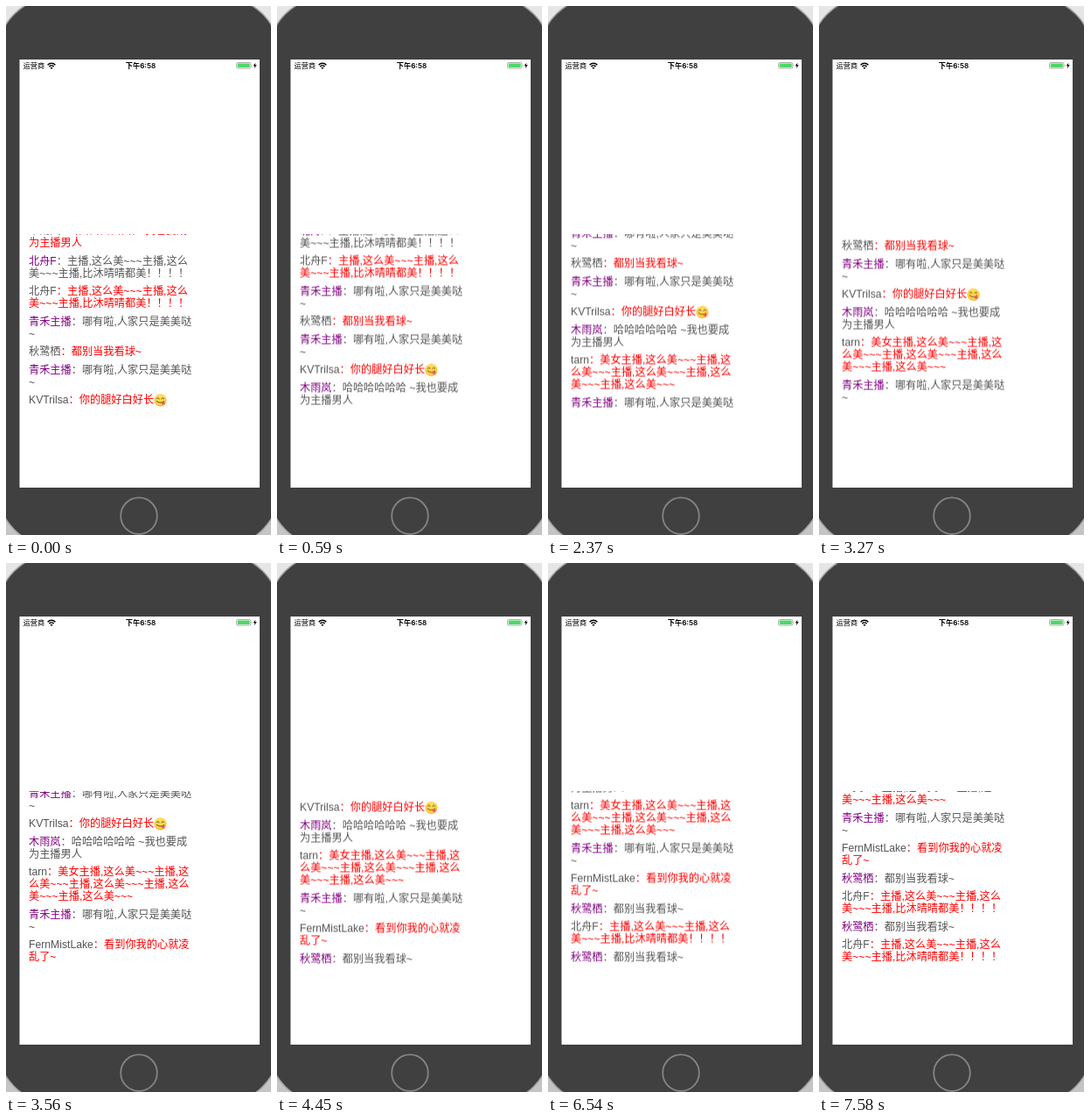
These frames come from a looping animation (303x603 px, 8 s). An HTML page:

```html
<!DOCTYPE html>
<html lang="zh-CN">
<head>
<meta charset="utf-8">
<title>聊天滚动</title>
<style>
  html, body { margin: 0; width: 100%; height: 100%; overflow: hidden; background: #e4e4e4; }
  .phone { position: absolute; left: 0; top: 0; display: block; }
  .status { font: 8.2px "Liberation Sans", "Noto Sans CJK SC", sans-serif; }
  .clock { font: 600 8.2px Inter, "Noto Sans CJK SC", sans-serif; }

  .chat { position: absolute; left: 26px; top: 260px; width: 200px; height: 199px; overflow: hidden; }
  .list { position: absolute; left: 0; top: -11px; animation: scroll 8s step-end infinite; }
  .row {
    margin-bottom: 6.5px;
    font: 12.2px/14px "Liberation Sans", "Noto Sans CJK SC", sans-serif;
    white-space: pre;
    color: #555;
  }
  .row b { font-weight: 400; }
  .host b { color: #800080; }
  .fan { color: #f00; }
  .fan b { color: #555; }
  .face { width: 15px; height: 15px; margin: -2px 0; vertical-align: -2px; }

  /* One message arrives about every second and slides in over 0.3 s */
  @keyframes scroll {
    0%      { transform: translateY(0); }
    3.625%  { transform: translateY(-3px); }
    5.5%    { transform: translateY(-27px); }
    7.375%  { transform: translateY(-34.5px); }
    16.75%  { transform: translateY(-46.5px); }
    18.5%   { transform: translateY(-78px); }
    20.375% { transform: translateY(-83px); }
    29.625% { transform: translateY(-100.5px); }
    31.5%   { transform: translateY(-117.5px); }
    40.875% { transform: translateY(-120.5px); }
    42.625% { transform: translateY(-144.5px); }
    44.5%   { transform: translateY(-152px); }
    53.875% { transform: translateY(-157.5px); }
    55.625% { transform: translateY(-170.5px); }
    57.5%   { transform: translateY(-172.5px); }
    66.75%  { transform: translateY(-190px); }
    68.625% { transform: translateY(-207px); }
    78%     { transform: translateY(-208.5px); }
    79.875% { transform: translateY(-222.5px); }
    81.75%  { transform: translateY(-227.5px); }
    91%     { transform: translateY(-235.5px); }
    92.875% { transform: translateY(-259px); }
    94.75%, 100% { transform: translateY(-262px); }
  }
</style>
</head>
<body>
<svg class="phone" width="303" height="603" viewBox="0 0 303 603">
  <defs>
    <linearGradient id="desk" x2="0" y2="1">
      <stop stop-color="#e6e6e6"/>
      <stop offset="1" stop-color="#c4c4c4"/>
    </linearGradient>
  </defs>
  <rect width="303" height="603" fill="url(#desk)"/>
  <rect x="-10" y="-10" width="323" height="626" rx="66" fill="#404040" stroke="#a3a3a3" stroke-width="1.5"/>
  <rect x="15.5" y="61" width="274.5" height="488" fill="#fff"/>
  <circle cx="152" cy="581.2" r="20.8" fill="none" stroke="#838383" stroke-width="1.8"/>

  <text class="status" x="19.5" y="71">运营商</text>
  <g fill="none" stroke="#000" stroke-width="1.5">
    <path d="M47.6 67.2a6.2 6.2 0 0 1 8.8 0"/>
    <path d="M49.4 69.1a3.7 3.7 0 0 1 5.2 0"/>
  </g>
  <path d="M52 72l-1.5-1.6a2.2 2.2 0 0 1 3 0z"/>
  <text class="clock" x="154" y="71" text-anchor="middle">下午6:58</text>
  <rect x="263.5" y="64.5" width="16.4" height="6.6" rx="1.6" fill="none" stroke="#999" stroke-width=".8"/>
  <rect x="264.7" y="65.6" width="14" height="4.4" rx=".8" fill="#4cd964"/>
  <path d="M280.8 66.6q1.1 1.2 0 2.4z" fill="#999"/>
  <path d="M285.6 64.4l-3 3.9h1.9l-.8 3 3.1-4h-2z"/>
</svg>

<div class="chat"><div class="list" id="list"></div></div>

<script>
  const praise = '主播,这么美~~~主播,这么\n美~~~主播,比沐晴晴都美！！！！';
  const shy = '哪有啦,人家只是美美哒\n~';
  const laugh = '哈哈哈哈哈哈 ~我也要成\n为主播男人';
  const ball = '都别当我看球~';
  const long = '美女主播,这么美~~~主播,这\n么美~~~主播,这么美~~~主播,这么\n美~~~主播,这么美~~~';
  const face = `<svg class="face" viewBox="0 0 30 30">
    <circle cx="15" cy="15" r="14" fill="#f9b52c"/>
    <circle cx="15" cy="13.5" r="12.4" fill="#ffdb55"/>
    <g fill="none" stroke="#6b3d0c" stroke-width="2" stroke-linecap="round">
      <path d="M6.5 11.5q3-5 6 0M17.5 11.5q3-5 6 0"/>
      <path d="M6.5 17q8.500 7 17 0"/>
    </g>
    <path d="M16 20.300q5-1 7-3.300q4 4 1.500 7q-4 3-8.500-3.700z" fill="#ee5a5f"/>
  </svg>`;

  const rows = [
    ['fan', '木雨岚', laugh],
    ['host', '北舟F', praise],
    ['fan', '北舟F', praise],
    ['host', '青禾主播', shy],
    ['fan', '秋鹭栖', ball],
    ['host', '青禾主播', shy],
    ['fan', 'KVTrilsa', '你的腿好白好长' + face],
    ['host', '木雨岚', laugh],
    ['fan', 'tarn', long],
    ['host', '青禾主播', shy],
    ['fan', 'FernMistLake', '看到你我的心就凌\n乱了~'],
    ['host', '秋鹭栖', ball],
    ['fan', '北舟F', praise],
    ['host', '秋鹭栖', ball],
    ['fan', '北舟F', praise],
  ];

  document.getElementById('list').innerHTML = rows
    .map(([kind, name, text]) => `<div class="row ${kind}"><b>${name}</b>：${text}</div>`)
    .join('');
</script>
</body>
</html>
```
